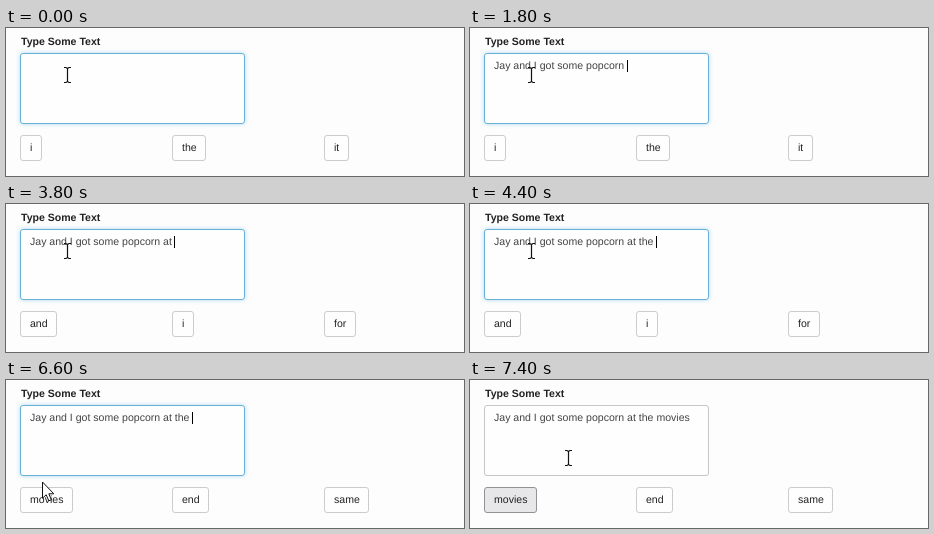
An HTML page for the animation above (8000 ms loop, 458 px wide and 148 px high).

```html
<!DOCTYPE html>
<html lang="en">
<head>
<meta charset="utf-8">
<title>Word suggestions</title>
<style>
  html, body { margin: 0; width: 100%; height: 100%; overflow: hidden; background: #fdfdfd; }
  svg { display: block; }
  text {
    font: 10.55px "Liberation Sans", Arial, sans-serif;
    text-rendering: geometricPrecision;
    white-space: pre;
    fill: #222;
  }
  .label { font-weight: bold; }
  #typed { fill: #444; }
  #area { fill: #fefefe; stroke: #c6c6c6; }
  #area.focus { stroke: #68b2da; filter: drop-shadow(0 0 2px rgba(102, 175, 225, .5)); }
  .button rect { fill: #fefefe; stroke: #ccc; }
  .button.down rect { fill: #e7e7e9; stroke: #929296; }
</style>
</head>
<body>
<svg width="458" height="148" viewBox="0 0 458 148">
  <text class="label" x="15" y="17">Type Some Text</text>
  <rect id="area" x="14.5" y="25.5" width="224" height="70" rx="2.5"/>
  <text id="typed" x="24" y="41"></text>
  <rect id="caret" y="32" width="1" height="12"/>
  <g id="buttons"></g>
  <path id="beam" d="M-3.5-7.5H-1.5L0-6.5 1.5-7.5H3.5M0-6.5V6.5M-3.5 7.5H-1.5L0 6.5 1.5 7.5H3.5" fill="none" stroke="#111" stroke-width="1.2"/>
  <path id="arrow" d="M0 0V16.2L3.7 12.8 6.3 18.8 8.8 17.7 6.3 11.8H11.3Z" fill="#fff" stroke="#111"/>
</svg>
<script>
const LOOP = 8000;
const STEP = 200;    // the picture is refreshed five times a second
const BLINK = 500;
const PRESS = 6800;
const BLUR = 7000;
const AREA_BOTTOM = 96;

const INPUT = [
  [1000, ""],
  [1800, "Jay and I got some popcorn "],
  [2600, "a"],
  [2800, "t"],
  [3800, " "],
  [4200, "the"],
  [4400, " "],
  [BLUR, "movies"]
];

const SUGGESTIONS = [
  [0, "i the it"],
  [3600, "and i for"],
  [4800, "athletic athletes athlete"],
  [6000, "movies end same"]
];

// pointer stops: time, x, y
const STOPS = [
  [6000, 61.5, 47],
  [6400, 36.5, 102],
  [6600, 36.5, 102],
  [PRESS, 38.5, 128],
  [BLUR, 38.5, 129],
  [7400, 98.5, 78]
];

const $ = id => document.getElementById(id);
const until = (steps, t) => steps.filter(step => step[0] <= t);
const show = (el, on) => el.setAttribute("visibility", on ? "visible" : "hidden");

function make(tag, parent, attrs) {
  const el = document.createElementNS("http://www.w3.org/2000/svg", tag);
  for (const key in attrs) el.setAttribute(key, attrs[key]);
  return parent.appendChild(el);
}

const buttons = [0, 1, 2].map(i => {
  const x = 14 + 152 * i;
  const group = make("g", $("buttons"), { class: "button" });
  return {
    group,
    box: make("rect", group, { x: x + .5, y: 107.5, height: 25, rx: 2.5 }),
    text: make("text", group, { x: x + 10, y: 123 })
  };
});

function drawInput(t) {
  const done = until(INPUT, t);
  const focus = t < BLUR;
  $("typed").textContent = done.map(step => step[1]).join("");
  $("area").classList.toggle("focus", focus);

  // the caret restarts its blinking after each key
  const last = done.length ? done[done.length - 1][0] : Infinity;
  show($("caret"), focus && Math.floor((t - last) / BLINK) % 2 === 0);
  $("caret").setAttribute("x", Math.floor(24 + $("typed").getComputedTextLength()));
}

function drawButtons(t) {
  const words = until(SUGGESTIONS, t).pop()[1].split(" ");
  buttons.forEach(({ box, text }, i) => {
    text.textContent = words[i];
    box.setAttribute("width", Math.floor(text.getComputedTextLength() + 19));
  });
  buttons[0].group.classList.toggle("down", t >= PRESS);
}

function drawPointer(t) {
  const from = until(STOPS, t).pop() || STOPS[0];
  const to = STOPS.find(stop => stop[0] > t) || from;
  const part = to === from ? 0 : (t - from[0]) / (to[0] - from[0]);
  const [x, y] = [1, 2].map(i => from[i] + (to[i] - from[i]) * part);
  const inside = y < AREA_BOTTOM;
  const shape = $(inside ? "beam" : "arrow");
  shape.setAttribute("transform", `translate(${x} ${y})`);
  show($("beam"), inside);
  show($("arrow"), !inside);
}

const begin = performance.now();
function tick() {
  const now = (performance.now() - begin) % LOOP;
  const t = Math.floor(now / STEP) * STEP;
  drawInput(t);
  drawButtons(t);
  drawPointer(t);
  requestAnimationFrame(tick);
}
tick();
</script>
</body>
</html>
```
